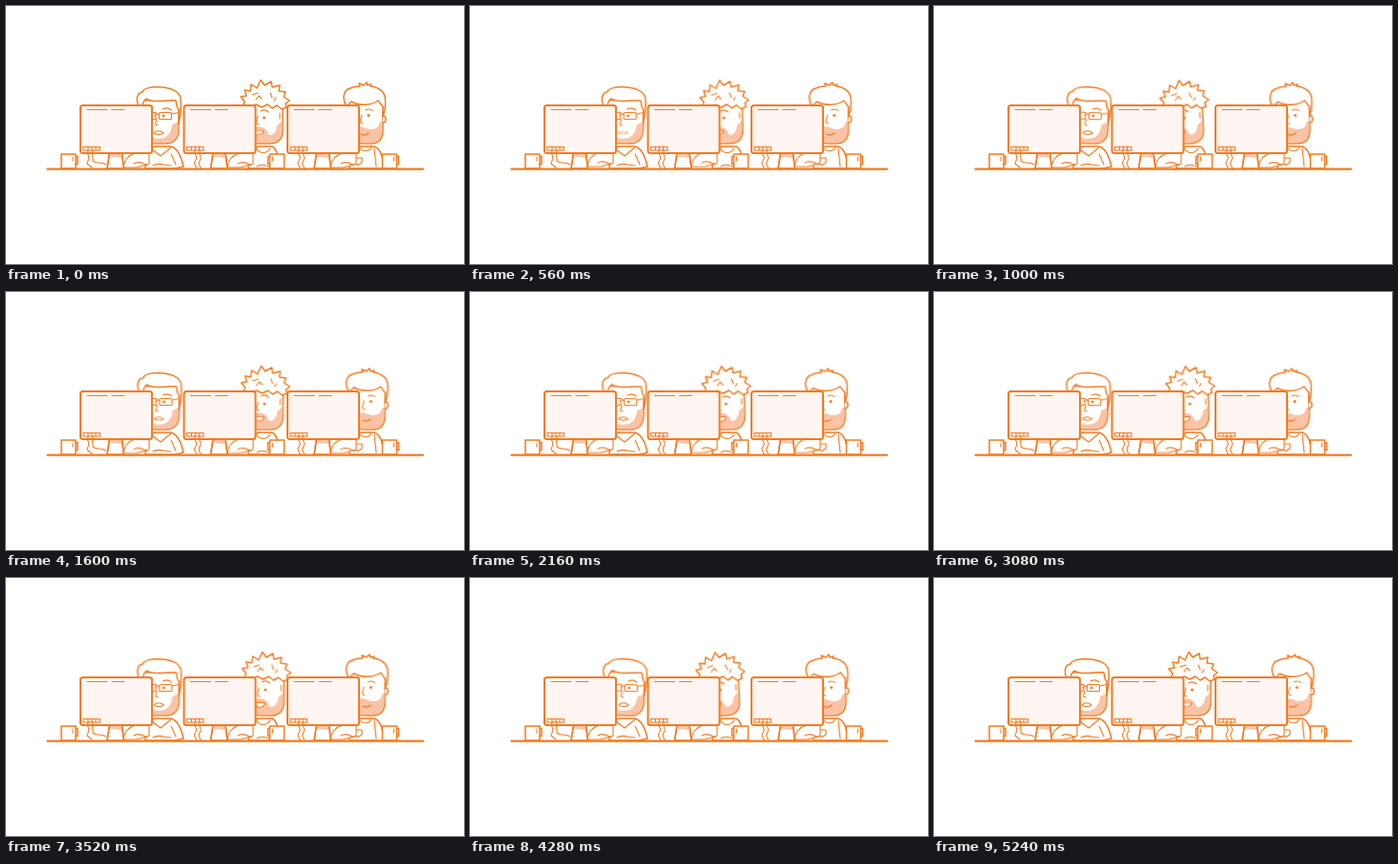
These frames come from a looping animation (480 by 270 pixels, 5.28 s). An HTML page without scripts:

```html
<!DOCTYPE html>
<html lang="en">
<head>
<meta charset="utf-8">
<title>Team at work</title>
<style>
html, body { margin: 0; width: 100%; height: 100%; overflow: hidden; background: #fff; }
svg { display: block; width: 100vw; height: 100vh; }
.ink { fill: none; stroke: #f47b20; stroke-width: 1.5; stroke-linecap: round; stroke-linejoin: round; }
.paper { fill: #fff; }
.thin { stroke-width: 1.1; }
.bold { stroke-width: 2; }
.tint { fill: #fac3a5; stroke: none; }
.dot { fill: #f47b20; stroke: none; }

/* The whole scene runs forward, then back */
.head, .mouth, .brow, .arm {
  animation: 2640ms ease-in-out infinite alternate;
}
#ann .head { transform-origin: 163px 148px; animation-name: nod; }
#bob .head { transform-origin: 273px 148px; animation-name: sway; }
#cal .head { transform-origin: 382px 148px; animation-name: lean; }
#ann .mouth { transform-origin: 160px 132px; animation-name: mumble; }
#bob .mouth { transform-origin: 266px 131px; animation-name: talk; }
#bob .brow { animation-name: raise; }
.arm { animation-name: type; }

@keyframes nod {
  0%, 8% { transform: none; }
  38% { transform: translateX(.6px) rotate(2deg); }
  67% { transform: translateX(.2px) rotate(.3deg); }
  82% { transform: translateX(.5px) rotate(1.2deg); }
  100% { transform: translateX(.4px) rotate(.8deg); }
}
@keyframes sway {
  0%, 3% { transform: none; }
  38% { transform: translateX(-6.6px) rotate(-3deg); }
  67% { transform: translateX(1px) rotate(.6deg); }
  82% { transform: translateX(-1.5px) rotate(-1.6deg); }
  100% { transform: translateX(-1.7px) rotate(-1.8deg); }
}
@keyframes lean {
  0% { transform: none; }
  7% { transform: translateX(3.4px) rotate(1deg); }
  38% { transform: translateX(-.8px) rotate(-1deg); }
  53%, 67% { transform: translateX(2px) rotate(.7deg); }
  82%, 100% { transform: translateX(-1.2px) rotate(-1.3deg); }
}
@keyframes mumble {
  0%, 38%, 67% { transform: none; }
  20%, 54%, 92% { transform: scaleY(.65); }
  82%, 100% { transform: scaleY(.9); }
}
@keyframes talk {
  0% { transform: scaleY(.75); }
  20%, 52% { transform: scaleY(.6); }
  38%, 67%, 82%, 100% { transform: none; }
}
@keyframes raise {
  0%, 38% { transform: none; }
  67% { transform: translateY(-1px); }
  82%, 100% { transform: none; }
}
@keyframes type {
  0%, 8%, 38%, 67%, 100% { transform: none; }
  24%, 53%, 82% { transform: translateY(-.8px); }
}
</style>
</head>
<body>
<svg viewBox="0 0 480 270">
  <defs>
    <g id="screen">
      <path class="paper" d="M108.5 154H121.5L123.500 170H106Z"/>
      <path class="tint" d="M108.500 154H121.500L122 159L108 157.500Z"/>
      <path d="M108.500 154L106 170M121.500 154L123.500 170"/>
      <rect class="bold" x="78" y="104" width="75" height="50" rx="2.500" fill="#fff6f3"/>
      <path class="thin" d="M85 108.500H106M111 108.500H124"/>
      <path class="thin" d="M81 147.500H98.500V151H81ZM86 147.500V151M90 147.500V151M94 147.500V151"/>
    </g>
    <path id="cables" class="thin" d="M90 151C88 156 94 157 91 161S90 166 92 170M95 151C93 156 98 157 95.500 161S94 166 96.500 170"/>
    <g id="mug">
      <path class="paper" d="M58 155H73V170H58Z"/>
      <path d="M73 157.500H75V165.500H73"/>
      <path class="thin" d="M70 158V162"/>
    </g>
    <g id="hands" class="thin">
      <path class="paper" d="M123 169C124 161 128 156 136 154H150V165L137 169Z"/>
      <path d="M134 165C138 162 143 164 148 167"/>
    </g>
  </defs>

  <g class="ink">
    <g id="ann">
      <path class="paper" d="M146 170V151L156 147H173C180 149 184 159 186 168L177 170Z"/>
      <path class="thin" d="M153 150L162 157L173 148M173 155L178 166M154 167C160 163 166 167 173 167"/>
      <use class="arm" href="#hands"/>
      <g class="head">
        <path class="paper" d="M142 99V130C142 139 148 144 158 144H167C177 144 181 137 181 129V98Z"/>
        <path class="tint" d="M180.300 121V130C180 138 175 143.300 167 143.300H154V138C166 141 173 136 174 124Z"/>
        <path class="paper" d="M139 105C136 98 137 91 143 90C144 86 153 84 163 85C176 86 183 91 183 98C184 107 183 114 181 123V108C178 106 179 102 178 99C167 98 154 102 147 97C144 99 143 103 143 107Z"/>
        <path class="thin" d="M164 108C168 106 171 107 173 109"/>
        <rect class="thin paper" x="160.500" y="111.500" width="13" height="7" rx="1"/>
        <path class="thin" d="M160.500 114C158 112 157 113 156 115M149 111.500H157V118.500H149M173.500 113L181 111.500M158 119C157 123 155 124 159 125"/>
        <circle class="dot" cx="165" cy="115" r="1.400"/>
        <path class="mouth thin paper" d="M155 133C157 130 162 130 165 133C162 135 158 135 155 133Z"/>
      </g>
    </g>

    <g id="bob">
      <path class="paper" d="M254 170V151L264 147H279C283 149 284 153 285 157V170Z"/>
      <path class="thin" d="M262 149C266 155 273 155 277 149M263 168C267 164 272 167 276 168"/>
      <use class="arm" href="#hands" x="109"/>
      <g class="head">
        <path class="paper" d="M250 102V130C250 139 257 144 266 144H276C286 144 290 138 290 129V104Z"/>
        <path class="tint" d="M289.300 120V130C289 138 285 143.300 276 143.300H258V128C266 125 272 127 274 132C275 137 283 136 284 125Z"/>
        <path class="paper" d="M248 106L250 100L246 95L252 94L250 88L256 89L257 82L263 86L267 77.500L271 83L278 79L279 85L287 83L286 89L293 90L291 95L297 99L293 102L294 106L289 108L284 104L279 107L274 103L268 106L262 103L255 107Z"/>
        <path class="thin" d="M258 93L264 91M262 98L265 94L268 97M277 91L279 96M283 96L281 99"/>
        <path class="brow thin" d="M267 110C270 108 273 109 275 111"/>
        <circle class="dot" cx="270.500" cy="117" r="1.500"/>
        <path class="thin" d="M264 115C263 120 260 123 265 124M287 112V118"/>
        <path class="mouth thin paper" d="M261 130.500H270C270 135 264 137 261 134Z"/>
      </g>
    </g>

    <g id="cal">
      <path class="paper" d="M360 170V151L370 147H386C392 149 396 159 396 170Z"/>
      <path class="thin" d="M370 148C374 153 380 153 383 148M386 149L388 168M364 159H373V164L368.500 166.500L364 164Z"/>
      <use class="arm" href="#hands" x="217"/>
      <g class="head">
        <path class="paper" d="M358 99V130C358 139 365 144 374 144H382C392 144 395 138 395 129V99Z"/>
        <path class="paper" d="M395 115C399 114 399 122 395 122"/>
        <path class="tint" d="M394.300 121V130C394 138 390 143.300 382 143.300H366V127C375 124 378 130 384 129C390 128 391 125 392 121Z"/>
        <path class="paper" d="M357 105C352 98 353 88 361 86C365 84 368 84 371 84L370 81L375 83L378 80L379 83L383 82L382 84C392 85 398 91 397.500 99C398 106 397 111 395 116V105C393 104 392 101 390 99C383 104 371 105 362 100Z"/>
        <path class="thin" d="M377 109C380 107 382 108 384 109.500M373 114C372 119 369 122 374 123"/>
        <circle class="dot" cx="380" cy="114.500" r="1.500"/>
        <path class="thin" d="M372 134C375 136 378 135 380 133"/>
      </g>
    </g>

    <use href="#screen"/>
    <use href="#screen" x="108.500"/>
    <use href="#screen" x="217"/>
    <path class="thin" d="M86 151C84 156 89 158 86 162S88 167 90 169M91 151C89 156 92 159 91 162C95 166 99 162 105 166"/>
    <use href="#cables" x="108"/>
    <use href="#cables" x="216.500"/>
    <use href="#mug"/>
    <use href="#mug" transform="matrix(-1 0 0 1 349.500 0)"/>
    <use href="#mug" x="336.500"/>
    <path stroke-width="2.200" d="M43.500 170.700H437"/>
  </g>
</svg>
</body>
</html>
```
